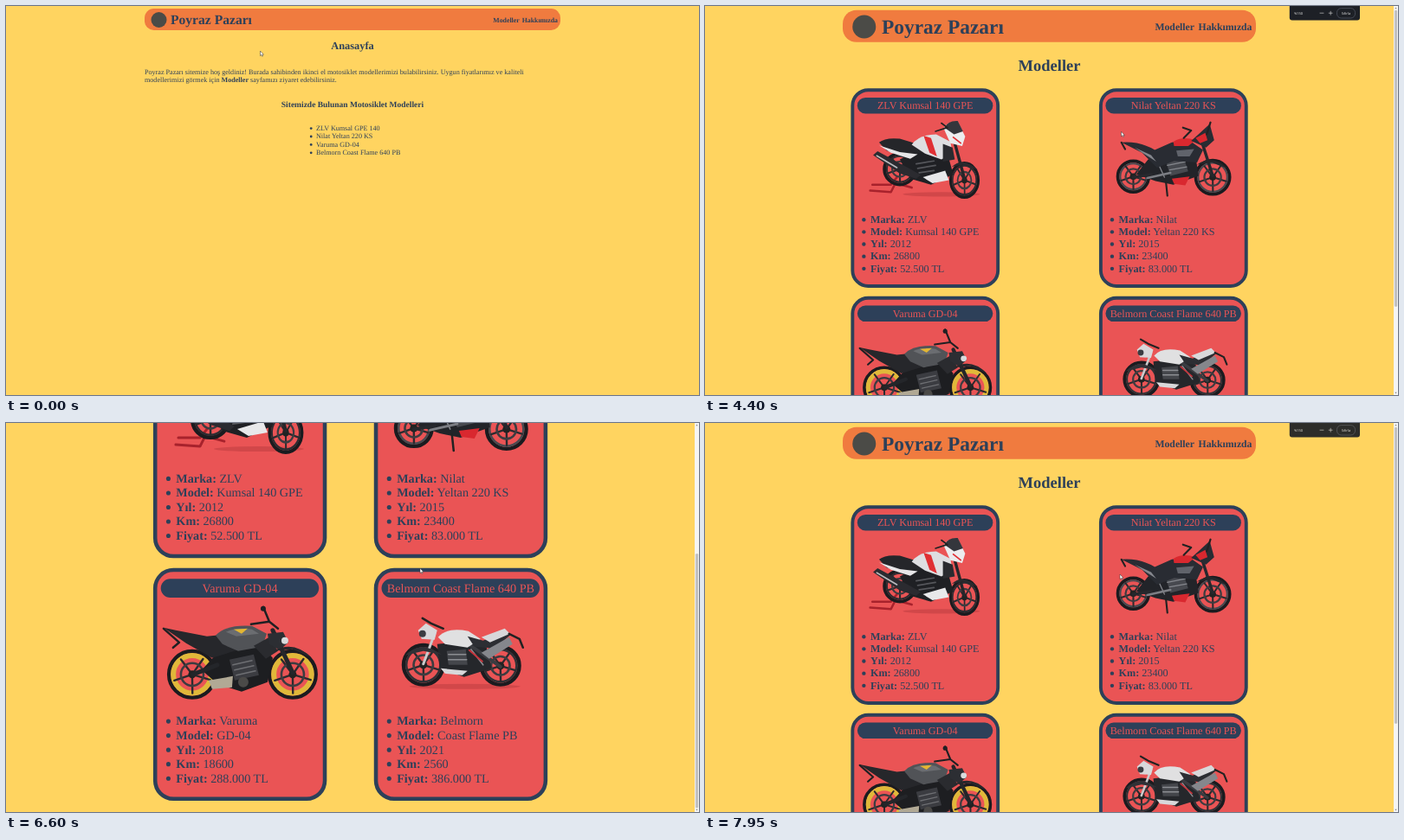
An HTML page for the animation above (8000 ms loop, 800 by 450 pixels).

```html
<!DOCTYPE html>
<html lang="tr">
<head>
<meta charset="utf-8">
<title>Motosiklet</title>
<style>
  html, body { margin: 0; width: 100%; height: 100%; overflow: hidden; background: #ffd460; }
  svg { display: block; width: 100vw; height: 100vh; }
  text { font: 8.12px "Liberation Serif", serif; fill: #2d4059; text-rendering: geometricPrecision; }
  .b { font-weight: bold; }
  .nav { font-size: 7.83px; font-weight: bold; text-anchor: end; }
  .mid { text-anchor: middle; }
  .ui { font: 4px "Open Sans", sans-serif; fill: #eee; }
</style>
</head>
<body>
<svg id="stage" viewBox="0 0 800 450"></svg>
<script>
const INK = '#2d4059', RED = '#ea5455';
const $ = id => document.getElementById(id);
const set = (id, attrs) => Object.entries(attrs).forEach(([k, v]) => $(id).setAttribute(k, v));
const show = (id, on) => set(id, { visibility: on ? 'visible' : 'hidden' });

const fill = (color, d) => `<path d="${d}" fill="${color}"/>`;
const line = (color, w, d) =>
  `<path d="${d}" fill="none" stroke="${color}" stroke-width="${w}" stroke-linecap="round" stroke-linejoin="round"/>`;
const circle = (x, y, r, color) => `<circle cx="${x}" cy="${y}" r="${r}" fill="${color}"/>`;
const text = (x, y, s, cls = '', extra = '') => `<text x="${x}" y="${y}" class="${cls}" ${extra}>${s}</text>`;

function wheel(x, y, r, rim, squash = 1, rimWidth = 2.5) {
  let spokes = '';
  for (let i = 0; i < 5; i++) {
    const a = i * Math.PI * 0.4 + 0.3;
    spokes += `M0 0L${(Math.cos(a) * r * 0.75).toFixed(1)} ${(Math.sin(a) * r * 0.75).toFixed(1)}`;
  }
  return `<g transform="translate(${x} ${y}) scale(${squash} 1)">
    <circle r="${r - 2.2}" fill="none" stroke="#1b1b1f" stroke-width="4.4"/>
    <circle r="${r - 4.2 - rimWidth / 2}" fill="none" stroke="${rim}" stroke-width="${rimWidth}"/>
    ${line('#2c2a2e', 2.4, spokes)}
    <circle r="${r * 0.45}" fill="none" stroke="#3d3c40" stroke-width="2.6"/>
    ${circle(0, 0, 4.5, '#222')}</g>`;
}
const shadow = (x, y, rx) => `<ellipse cx="${x}" cy="${y}" rx="${rx}" ry="3" fill="#a03035" opacity=".35"/>`;

// Bikes are drawn in a 200 x 270 card space.
const bikes = [
  shadow(122, 143, 52) +
  line('#a8222c', 3, 'M26 138L54 140L60 128L82 134M29 130H54L62 120') +
  wheel(66, 109, 23, '#2c2c31') + wheel(153, 124, 25, '#2c2c31', .82) +
  fill('#1f2024', 'M66 96L92 82L130 88L138 116L108 130L80 122Z') +
  line('#55565b', 2, 'M88 102L112 98M90 108L114 104M92 114L112 111') +
  fill('#2b2b30', 'M30 90L36 85L82 110L94 117L88 122L66 115Z') +
  line('#b9b9bd', 2, 'M35 91L62 107') +
  line('#26262a', 4, 'M140 74L153 122') +
  fill('#25262a', 'M38 73Q46 66 66 68L86 74L96 86L74 92L48 84Z') +
  fill('#e6e6e8', 'M38 77L66 86L90 89L80 95L54 87Z') +
  fill('#dedee1', 'M82 76Q92 62 115 62L134 72L137 88L122 96L100 88Z') +
  fill('#e03034', 'M98 64L108 67L116 92L106 87Z') +
  fill('#2a2b30', 'M124 75L137 80L140 96L124 99Z') +
  fill('#ececee', 'M125 54Q130 44 144 45L154 65L150 78L134 74Z') +
  fill('#34363c', 'M126 53Q131 43 144 44L151 58L139 62Z') +
  line('#e03034', 2, 'M138 66L148 74') +
  fill('#e8e8ea', 'M97 120L127 111L132 124L110 128Z') +
  fill('#2a2a2e', 'M136 106Q151 92 171 110L151 103Z') + line('#222', 2, 'M114 58L130 53L122 47'),

  wheel(46, 119, 23, '#494a50') + wheel(153, 120, 25, '#494a50') +
  fill('#222429', 'M50 116L66 96L106 84L130 92L134 118L100 130L76 125Z') +
  fill('#47494f', 'M90 98L114 94L120 112L96 118Z') +
  line('#85878d', 1.5, 'M92 104L116 99M95 110L118 106M78 98L88 120') +
  line('#26282d', 4, 'M139 74L153 118M70 116L46 120') +
  fill('#292c33', 'M30 73Q54 71 75 83L98 73L121 70L140 83L132 100L101 98L78 107L58 87Z') +
  fill('#85878e', 'M48 80L70 90L77 99L60 88Z') +
  fill('#60636b', 'M104 84L128 82L122 92L106 92Z') +
  fill('#d9282f', 'M100 72Q112 64 130 70L120 78L101 78Z') +
  fill('#292c33', 'M124 71L136 60L149 48L155 70L144 80Z') +
  fill('#d9282f', 'M130 67L143 60L146 70L136 74Z') +
  fill('#d9282f', 'M98 122L122 119L116 131L101 129Z') +
  fill('#25272b', 'M132 103Q153 88 172 108L152 100Z') +
  line('#222', 2.5, 'M90 126L92 145M114 67L124 57L113 53M145 62L150 46M30 73L35 82') +
  line('#7c7e84', 3, 'M65 121L96 114'),

  wheel(45, 123, 29, '#e0b83a', 1, 6) + wheel(161, 123, 29, '#e0b83a', 1, 6) +
  fill('#1d1e21', 'M56 118L78 94L124 88L138 104L132 132L102 143L74 134Z') +
  fill('#3b3c41', 'M88 106L116 100L122 124L94 130Z') +
  line('#6e6f73', 1.6, 'M92 112L114 107M94 118L116 113M96 124L118 119') +
  circle(104, 132, 6, '#4b4a48') +
  line('#24262a', 5, 'M138 72L161 121M74 112L46 123') +
  fill('#26272b', 'M12 69L26 72L62 79L82 77L100 94L68 104L38 87Z') +
  fill('#515357', 'M72 78Q84 65 114 67L131 76L126 91L98 96L80 88Z') +
  fill('#6b6d71', 'M84 74Q96 68 114 71L122 76L96 79Z') +
  fill('#e3b633', 'M93 71L109 70L102 76Z') +
  fill('#2a2b2f', 'M116 90L134 80L144 96L130 105Z') +
  fill('#2c2e33', 'M132 76L150 74L156 86L146 95L134 88Z') + circle(152, 84, 4, '#d9dbdd') +
  fill('#b1a995', 'M64 130L92 125L91 138L68 140Z') +
  fill('#26272b', 'M139 96Q162 83 183 104L161 94Z') +
  line('#1f2023', 2.5, 'M113 65L134 62L127 45M134 62L144 70M12 70L30 86L23 92') +
  circle(127, 47, 3, '#1f2023'),

  shadow(105, 137, 64) +
  wheel(57, 112, 25, '#303136') + wheel(146, 113, 24, '#303136') +
  fill('#25272b', 'M73 88L108 84L130 92L136 116L104 126L76 116Z') +
  fill('#44464b', 'M84 96L106 94L108 112L86 112Z') +
  line('#8b8d92', 1.6, 'M86 100H106M86 106H107M112 94L126 112') +
  line('#c9cacc', 3, 'M70 76L57 111') + line('#3a3c41', 4, 'M112 90L146 114') +
  fill('#e0e0e1', 'M74 80Q84 68 109 73L123 82L108 92L82 88Z') +
  fill('#2c2e33', 'M108 79L126 84L152 73L158 77L139 93L116 91Z') +
  fill('#d8d8da', 'M124 80L151 70L157 76L134 86Z') +
  fill('#85878c', 'M124 98L156 80L160 88L133 105Z') +
  fill('#d8d8da', 'M51 72L60 64L73 72L70 83L55 82Z') + circle(56, 76, 4, '#3a3c41') +
  fill('#d8d8da', 'M77 116L108 119L102 124L82 122Z') +
  fill('#303136', 'M36 101Q54 83 78 100L57 96Z') +
  line('#222', 2.5, 'M80 70L66 64L56 58M156 76L168 82L172 92') + line('#c5333a', 2, 'M110 95L125 108')
];

const models = [
  ['ZLV', 'Kumsal 140 GPE', 2012, '26800', '52.500', 'ZLV Kumsal 140 GPE', 'ZLV Kumsal GPE 140'],
  ['Nilat', 'Yeltan 220 KS', 2015, '23400', '83.000', 'Nilat Yeltan 220 KS'],
  ['Varuma', 'GD-04', 2018, '18600', '288.000', 'Varuma GD-04'],
  ['Belmorn', 'Coast Flame PB', 2021, '2560', '386.000', 'Belmorn Coast Flame 640 PB']
];

function card([brand, model, year, km, price, title], i) {
  const rows = [['Marka', brand], ['Model', model], ['Yıl', year], ['Km', km], ['Fiyat', price + ' TL']];
  return `<g id="card${i}">
    <rect x="1.3" y="1.3" width="111.9" height="151.2" rx="12" fill="${RED}" stroke="${INK}" stroke-width="2.6"/>
    <rect x="5" y="7.1" width="104.3" height="12.4" rx="6.2" fill="${INK}"/>
    ${text(57.2, 16.1, title, 'mid', `style="fill:${RED}"`)}
    <g transform="scale(.5714)">${bikes[i]}</g>
    ${rows.map(([k, v], n) => circle(10, 101.3 + n * 9.44, 1.45, INK) +
      text(15.1, 103.8 + n * 9.44, `<tspan class="b">${k}:</tspan> ${v}`)).join('')}
  </g>`;
}

$('stage').innerHTML = `
  <rect width="800" height="450" fill="#ffd460"/>
  <g id="page">
    <rect id="bar" y="3.1" height="24.8" rx="10.6" fill="#f07b3f"/>
    <g id="brand">${circle(16.5, 16, 9, '#4b4b47')}${text(30, 21.3, 'Poyraz Pazarı', 'b', 'style="font-size:15.6px"')}</g>
    <g id="links">${text(-47.3, 18.6, 'Modeller', 'nav')}${text(-3, 18.6, 'Hakkımızda', 'nav')}</g>
    <text id="heading" y="50" class="b mid" style="font-size:12.35px"></text>
    <g id="home">
      ${text(160, 78.9, 'Poyraz Pazarı sitemize hoş geldiniz! Burada sahibinden ikinci el motosiklet modellerimizi bulabilirsiniz. Uygun fiyatlarımız ve kaliteli')}
      ${text(160, 88.3, 'modellerimizi görmek için <tspan class="b">Modeller</tspan> sayfamızı ziyaret edebilirsiniz.')}
      ${text(400, 116.6, 'Sitemizde Bulunan Motosiklet Modelleri', 'b mid', 'style="font-size:9.5px"')}
      ${models.map((m, i) => circle(352.2, 141.6 + i * 9.4, 1.4, INK) + text(358, 144 + i * 9.4, m[6] || m[5])).join('')}
    </g>
    <g id="cards">${models.map(card).join('')}</g>
  </g>
  <g id="scrollbar">
    <rect x="795" width="5" height="450" fill="#f5f5f5"/>
    <rect id="thumb" x="795.9" width="3.3" rx="1" fill="#c1c1c1"/>
    ${fill('#888', 'M796.3 3.2L797.5 1.4L798.7 3.2ZM796.3 446.8L797.5 448.6L798.7 446.8Z')}
  </g>
  <g id="popup">
    <path d="M674.8 0H756V13.4Q756 16.4 753 16.4H677.8Q674.8 16.4 674.8 13.4Z" fill="#1d2026"/>
    <text id="percent" x="680" y="9.8" class="ui"></text>
    ${line('#ddd', .6, 'M710 8.2H714M720.2 8.2H724.2M722.2 6.2V10.2')}
    <rect x="729.5" y="2.6" width="21" height="11.4" rx="5" fill="none" stroke="#555a66" stroke-width=".7"/>
    ${text(740, 9.8, 'Sıfırla', 'ui mid')}
  </g>
  <g id="status">
    <rect y="443.5" width="70.5" height="6.5" fill="#20211f"/>
    ${text(2, 448.2, 'sunucu:0000/Ders_Odev_2/liste.html', 'ui', 'style="font-size:3.7px"')}
  </g>
  <g id="cursor" stroke-linejoin="round">
    <path id="arrow" d="M0 0V5.6L1.3 4.5L2.2 6.4L3 6L2.2 4.2H3.9Z" fill="#fff" stroke="#333" stroke-width=".5"/>
    <path id="hand" d="M1.3 .6Q1.9 0 2.2 .7V2.8L4.5 3.3Q5 3.6 4.7 5L4.1 7H1.8L.2 4.4Q.3 3.8 1.3 4.5Z" fill="#fff" stroke="#333" stroke-width=".5"/>
    <path id="beam" d="M0 .4H2.4M1.2 .4V6.6M0 6.6H2.4" fill="none" stroke="#333" stroke-width=".6"/>
  </g>`;

// time, x, y, pointer shape
const path = [
  [0, 293.5, 52, 'arrow'], [250, 240, 76, 'beam'], [400, 290, 125, 'arrow'], [500, 362, 165, 'beam'],
  [650, 470, 122, 'arrow'], [850, 597, 27, 'arrow'], [1050, 612, 17, 'hand'], [1300, 615, 16, 'hand'],
  [1700, 599, 15.2, 'hand'], [2000, 599, 15.2, 'hand'], [2150, 584, 15.2, 'hand'], [2550, 584, 15.2, 'arrow'],
  [3000, 520, 90, 'arrow'], [3400, 474, 160, 'arrow'], [3800, 490, 185, 'arrow'], [4300, 480.5, 145, 'arrow'],
  [4700, 480.5, 146, 'arrow'], [5000, 479, 155.5, 'arrow'], [5850, 479, 155.5, 'arrow'], [6600, 478, 168, 'arrow'],
  [7000, 479, 174, 'beam'], [7400, 479, 174, 'arrow'], [7550, 479, 175, 'arrow'], [8000, 479, 175, 'arrow']
];
const zooms = [[0, 1], [4050, 1.1], [4250, 1.25], [4350, 1.5], [4750, 1.75], [7750, 1.5]];
const last = (list, t) => list.findLastIndex(k => k[0] <= t);
const ease = (t, a, b) => {
  const u = Math.min(1, Math.max(0, (t - a) / (b - a)));
  return u * u * (3 - 2 * u);
};

function draw(t) {
  const home = t < 2550;
  const zoom = zooms[last(zooms, t)][1];
  const pageHeight = 385 * zoom;
  const scrolls = pageHeight > 450;
  const width = (scrolls ? 795 : 800) / zoom;
  const left = width * 0.2, right = width * 0.8;
  const scroll = 224 * (ease(t, 5500, 6176) - ease(t, 6600, 7415));

  set('page', { transform: `translate(0 ${-scroll}) scale(${zoom})` });
  set('bar', { x: left, width: right - left });
  set('brand', { transform: `translate(${left})` });
  set('links', { transform: `translate(${right})` });
  set('heading', { x: width / 2 });
  $('heading').textContent = home ? 'Anasayfa' : 'Modeller';
  models.forEach((m, i) => set('card' + i, {
    transform: `translate(${i % 2 ? right - 120.7 : left + 6.25} ${i < 2 ? 63.5 : 223.9})`
  }));
  show('home', home);
  show('cards', !home);

  show('scrollbar', scrolls);
  set('thumb', { y: 5 + 440 * scroll / pageHeight, height: 440 * 450 / pageHeight });

  const popupStart = t < 7750 ? 4050 : 7750;
  show('popup', t >= popupStart && (t < 6300 || t >= 7750));
  set('popup', { opacity: Math.max(0, Math.min(1, (t - popupStart + 50) / 270)) });
  $('percent').textContent = '%' + Math.round(zoom * 100);

  show('status', home && t >= 1700);
  set('status', { opacity: Math.min(1, Math.max(0, (t - 1650) / 200)) });

  const i = last(path, t), [t0, x0, y0, kind] = path[i], [t1, x1, y1] = path[i + 1];
  const u = (t - t0) / (t1 - t0);
  set('cursor', { transform: `translate(${x0 + (x1 - x0) * u} ${y0 + (y1 - y0) * u})` });
  ['arrow', 'hand', 'beam'].forEach(k => show(k, k === kind));
}

// Motion advances in 50 ms ticks.
const start = performance.now();
function tick() {
  draw(Math.floor((performance.now() - start) % 8000 / 50) * 50);
  requestAnimationFrame(tick);
}
tick();
</script>
</body>
</html>
```
